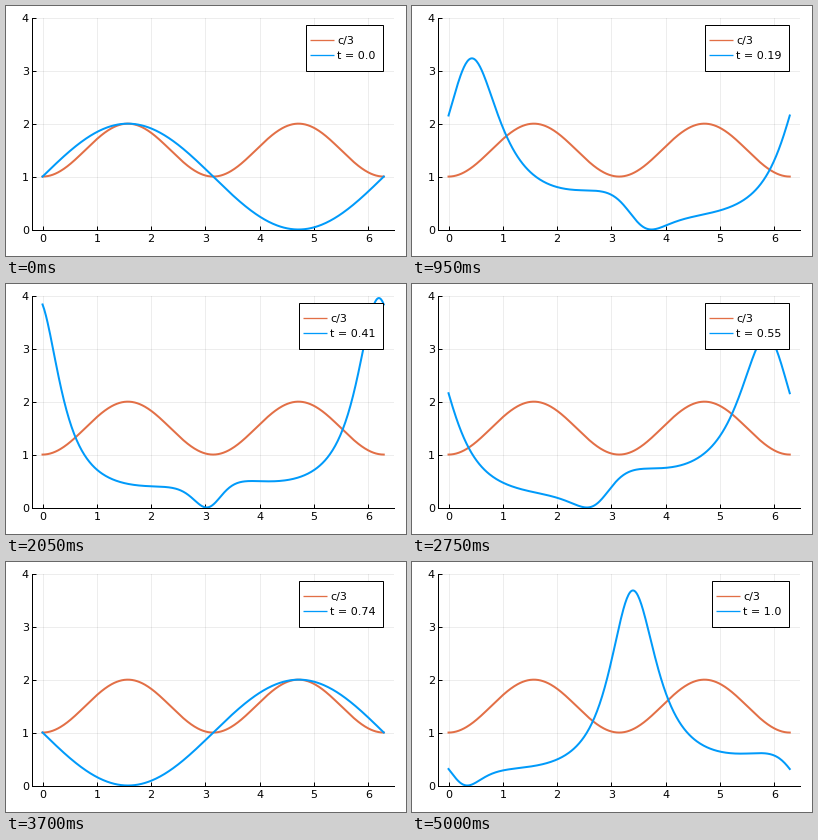
Animation of 400 by 250 pixels, one loop 5.05 s. Source, as a matplotlib script:

```python
import numpy as np
import matplotlib.pyplot as plt
from matplotlib.animation import FuncAnimation
from matplotlib.patches import Rectangle

W, H, DPI = 400, 250, 100
FRAMES, INTERVAL = 101, 50
PX = 72 / DPI
BLUE, ORANGE = "#009afa", "#e26f46"
LEFT, RIGHT, TOP, BOTTOM = 26.3, 388, 11.8, 223.5
PAD = 0.03 * 2 * np.pi
BOX_RIGHT, BOX_TOP, BOX_BOTTOM = 376.5, 18.5, 64.5

plt.rcParams.update({"font.family": "DejaVu Sans", "font.size": 8})

x = np.linspace(0, 2 * np.pi, 401)


def speed(s):
    return 1 + np.sin(s) ** 2


def travel(s):
    """Scaled travel time from 0 to s at the given speed."""
    turns = np.round(s / np.pi)
    return np.arctan(np.sqrt(2) * np.tan(s - turns * np.pi)) + turns * np.pi


def position(phase):
    turns = np.round(phase / np.pi)
    return np.arctan(np.tan(phase - turns * np.pi) / np.sqrt(2)) + turns * np.pi


def density(t):
    """Exact solution of u_t = (c u)_x with c = 3 (1 + sin^2 x)."""
    start = position(travel(x) + 3 * np.sqrt(2) * t)
    return speed(start) * (1 + np.sin(start)) / speed(x)


fig = plt.figure(figsize=(W / DPI, H / DPI), dpi=DPI, facecolor="white")
ax = fig.add_axes([LEFT / W, 1 - BOTTOM / H, (RIGHT - LEFT) / W, (BOTTOM - TOP) / H])
ax.set_xlim(-PAD, 2 * np.pi + PAD)
ax.set_ylim(0, 4)
ax.set_xticks(range(7))
ax.set_yticks(range(5))
ax.set_axisbelow(True)
ax.grid(color="black", alpha=0.07, lw=PX)
ax.tick_params(direction="in", length=4 * PX, width=PX,
               labelbottom=False, labelleft=False)
for side, spine in ax.spines.items():
    spine.set_visible(side in ("left", "bottom"))
    spine.set_linewidth(PX)
    spine.set_zorder(1)

ax.plot(x, speed(x), color=ORANGE, lw=2 * PX, zorder=3)
curve, = ax.plot(x, density(0), color=BLUE, lw=2 * PX, zorder=4)

# Overlay in pixel units, y pointing down
top = fig.add_axes([0, 0, 1, 1], zorder=5)
top.set_xlim(0, W)
top.set_ylim(H, 0)
top.axis("off")

for k in range(7):
    px = LEFT + (k + PAD) / (2 * np.pi + 2 * PAD) * (RIGHT - LEFT)
    top.text(px, 236.2, str(k), ha="center", va="baseline")
for k in range(5):
    py = BOTTOM - k / 4 * (BOTTOM - TOP)
    top.text(23, py + 4.2, str(k), ha="right", va="baseline")

box = top.add_patch(Rectangle((0, 0), 1, 1, fc="white", ec="black", lw=PX, zorder=1))
samples, labels = [], []
for y, color in ((34, ORANGE), (49.2, BLUE)):
    samples.append(top.plot([0, 1], [y, y], color=color, lw=1.3 * PX, zorder=2,
                            solid_capstyle="butt")[0])
    labels.append(top.text(0, y + 4, "c/3", va="baseline", zorder=2))


def update(i):
    t = round(i / 100, 2)
    text = f"t = {t}"
    curve.set_ydata(density(t))
    left = 300 if len(text) == 7 else 293
    box.set_bounds(left, BOX_TOP, BOX_RIGHT - left, BOX_BOTTOM - BOX_TOP)
    for line in samples:
        line.set_xdata([left + 4, left + 28])
    for label in labels:
        label.set_x(left + 31)
    labels[1].set_text(text)
    return curve, box, *samples, *labels


anim = FuncAnimation(fig, update, frames=FRAMES, interval=INTERVAL,
                     repeat=True, repeat_delay=0)
plt.show()
```
